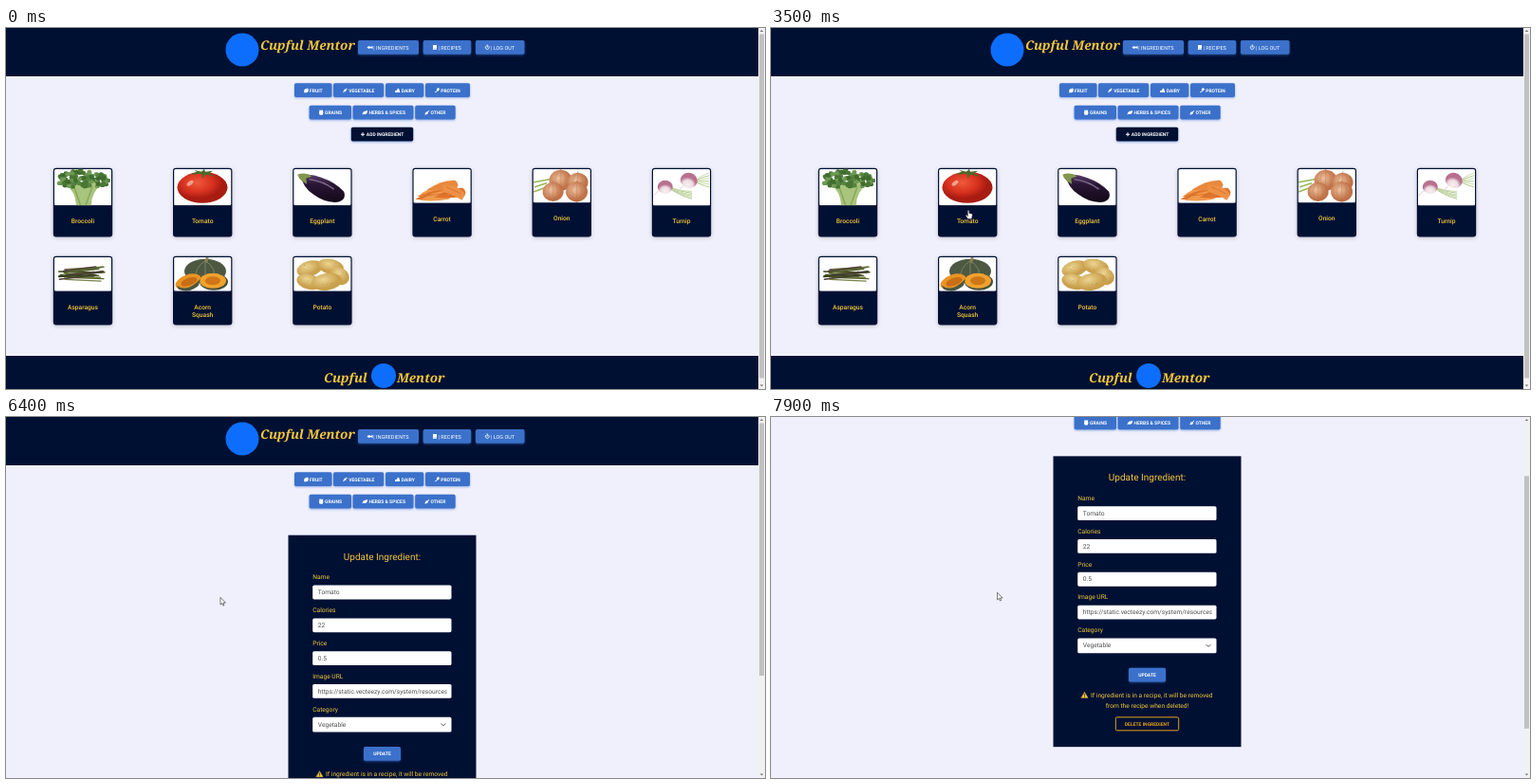
An HTML page that plays this animation: 800x381 px, repeating every 8000 ms.

```html
<!DOCTYPE html>
<html lang="en">
<head>
<meta charset="utf-8">
<title>Ingredients</title>
<style>
html, body { margin: 0; width: 100%; height: 100%; overflow: hidden; background: #f0f0fc; }
svg { display: block; width: 100%; height: 100%; }
text { font-family: Roboto, sans-serif; text-rendering: geometricPrecision; }
.brand { font: italic bold 13.5px "Noto Serif", serif; fill: #f4c63a; }
.btn { font-size: 5px; font-weight: 700; fill: #fff; }
.nav { font-size: 5.55px; fill: #fff; }
.gold { font-size: 6.67px; fill: #f4c63a; }
.field { font-size: 6.67px; fill: #4f4f4f; }
.mid { text-anchor: middle; }
.lift { filter: drop-shadow(0 1px 1.3px #3b71ca88); }
.card { filter: drop-shadow(0 1px 2px #0003); }
</style>
</head>
<body>
<svg id="stage" viewBox="0 0 800 381">
  <defs>
    <radialGradient id="red" cx=".4" cy=".35"><stop stop-color="#ef5a3c"/><stop offset=".6" stop-color="#d8321f"/><stop offset="1" stop-color="#a81c12"/></radialGradient>
    <radialGradient id="onion" cx=".4" cy=".4"><stop stop-color="#ecc09c"/><stop offset="1" stop-color="#c07248"/></radialGradient>
    <radialGradient id="turnip" cy=".8"><stop stop-color="#f8f0ee"/><stop offset=".6" stop-color="#ecdce2"/><stop offset="1" stop-color="#b8708e"/></radialGradient>
    <radialGradient id="potato" cx=".4" cy=".35"><stop stop-color="#ecd592"/><stop offset="1" stop-color="#c9a04c"/></radialGradient>
    <linearGradient id="plum" x2="0" y2="1"><stop stop-color="#57406a"/><stop offset=".35" stop-color="#2a1636"/><stop offset="1" stop-color="#120818"/></linearGradient>
    <clipPath id="urlBox"><path d="M326 282h138.5v16h-138.5z"/></clipPath>
    <clipPath id="photo"><path d="M1 1h60v39h-60z"/></clipPath>
  </defs>
  <g id="page"></g>
  <g id="bar"></g>
  <g id="cursor"></g>
</svg>
<script>
const NAVY = '#001033', BLUE = '#3b71ca', GOLD = '#f4c63a';
const $ = id => document.getElementById(id);
const rect = (x, y, w, h, fill, r = 0, more = '') =>
  `<rect x="${x}" y="${y}" width="${w}" height="${h}" rx="${r}" fill="${fill}" ${more}/>`;
const text = (x, y, cls, s, more = '') => `<text x="${x}" y="${y}" class="${cls}" ${more}>${s}</text>`;
const oval = (x, y, rx, ry, fill, turn = 0) =>
  `<ellipse cx="${x}" cy="${y}" rx="${rx}" ry="${ry}" fill="${fill}" transform="rotate(${turn} ${x} ${y})"/>`;
const path = (d, fill, stroke = 'none', w = 1) =>
  `<path d="${d}" fill="${fill}" stroke="${stroke}" stroke-width="${w}" stroke-linecap="round"/>`;
const repeat = (n, f) => Array.from({length: n}, (_, i) => f(i)).join('');

let seed = 7;
const rnd = () => (seed = seed * 16807 % 2147483647) / 2147483647;

// Icons on a 5 x 5 grid
const icons = {
  fish: 'M0 2.5Q2 .3 4.2 2L6 .8V4.2L4.2 3Q2 4.700 2.500Z',
  book: 'M.5 0H4.500V3.700H1.200V4.200H4.500V5H.5Z',
  fruit: 'M1.500 1H4.800V3Q4.500 5 2.500 5H.2V3Q.2 1.300 1.500 1ZM2.500 .8L4 0L4 .8Z',
  carrot: 'M0 5L1.500 1.700Q3 .6 3.600 2Q4 3 3 3.500ZM3.200 1.500L3.500 0L4.100 1L5 1.500L3.900 1.900Z',
  dairy: 'M0 3L2 2.500L3 .3L4.500 1.500L5.300 4.800H0Z',
  meat: 'M2 3.400Q1.300 .3 3.600 0Q5.500 .4 4.800 2Q4 3.400 2.500 3.500L1.300 4.700L.7 5L0 4.300L.6 3.800Z',
  grain: 'M.3 0H4.700L4.300 1.300L4.800 3L4 5H1L.2 3L.7 1.300Z',
  leaf: 'M0 5Q.2 1.500 3 1L5.500 .2Q5.500 4 2.800 4.200L1.200 4Z',
  other: 'M0 4.800L1 2.200Q2 1.300 3 1.500L4.700 0L5 .4L3.700 2.200Q3.900 4.300 2 4.500Z',
  plus: 'M2 .5H3V2H4.500V3H3V4.500H2V3H.5V2H2Z'
};
icons.fish = 'M0 2.5Q2 .3 4.2 2L6 .8V4.2L4.2 3Q2 4.7 0 2.5Z';
const icon = (name, x, y) => `<g transform="translate(${x} ${y})">${path(icons[name], '#fff')}</g>`;

function button(x, y, w, label, name, iconX, textX, fill = BLUE) {
  return rect(x, y, w, 14.7, fill, 1.7, 'class="lift"') + icon(name, iconX, y + 5) + text(textX, y + 9.4, 'btn', label);
}

const power = path('M511 18.600', 'none') +
  path('M506.200 18.800A2 2 0 1 0 508.400 18.800M507.300 17.800V20.300', 'none', '#fff', .8);
const header = rect(0, 0, 793, 51, NAVY) +
  '<circle cx="249" cy="23" r="17.500" fill="#0d6efd"/>' + text(268, 22.5, 'brand', 'Cupful Mentor') +
  [[371, 64], [439.7, 50.5], [495, 51.5]].map(([x, w]) => rect(x, 13, w, 14.8, BLUE, 1.7, 'class="lift"')).join('') +
  icon('fish', 380.5, 18) + text(387.3, 22.5, 'nav', '| INGREDIENTS') +
  icon('book', 449.5, 18) + text(455.5, 22.5, 'nav', '| RECIPES') +
  power + text(511, 22.5, 'nav', '| LOG OUT');

const filters = [
  [304, 58.3, 39.5, 'FRUIT', 'fruit', 314, 320], [345, 58.3, 53.2, 'VEGETABLE', 'carrot', 355, 361.2],
  [400, 58.3, 40.3, 'DAIRY', 'dairy', 410, 416.7], [442, 58.3, 47, 'PROTEIN', 'meat', 452, 458.2],
  [319.6, 81.8, 44.4, 'GRAINS', 'grain', 329.7, 336], [365.5, 81.8, 64, 'HERBS &amp; SPICES', 'leaf', 375.5, 382.5],
  [431.2, 81.8, 42.5, 'OTHER', 'other', 441.3, 447.5]
].map(b => button(...b)).join('');

const footer = y => rect(0, y, 793, 60, NAVY) + text(335, y + 28, 'brand', 'Cupful') +
  `<circle cx="398" cy="${y + 21}" r="13" fill="#0d6efd"/>` + text(412, y + 28, 'brand', 'Mentor');

// Food pictures, drawn from the card's top left corner
const food = {
  broccoli: () => path('M10 15Q24 24 24 40H40Q40 25 53 15Z', '#a9c47c') +
    path('M22 20L29 40M41 20L34 40', 'none', '#86a95c', 1.5) +
    repeat(110, () => {
      const a = rnd() * 6.28, d = Math.sqrt(rnd());
      const x = 31 + 28 * d * Math.cos(a), y = 10.5 + 9 * d * Math.sin(a) + Math.abs(x - 31) * .1;
      return oval(x, y, 2.6, 2.2, ['#3f6b2c', '#578441', '#6f9a55', '#487735'][rnd() * 4 | 0]);
    }),
  tomato: () => oval(31, 20.5, 26.5, 16.5, 'url(#red)') + oval(18, 16, 4, 2, '#f2a08c', -35) +
    path('M31 6L18 7L25 4L22 2L30 4L33 1L34 4L42 3L38 6L45 9L34 7L31 11Z', '#4a6a2c'),
  eggplant: () => path('M9 8Q18 5 30 10Q45 15 54 25Q57 34 47 36Q34 37 22 28Q10 20 9 8Z', 'url(#plum)') +
    path('M18 12Q32 14 43 22', 'none', '#7b6888', 1.5) + path('M5 7L8 6Q16 5 20 9L14 11L15 17L10 14L7 11Z', '#82964f'),
  carrot: () => repeat(6, i => {
    const x = [5, 9, 3, 15, 8, 23][i], y = [30, 27, 33, 23, 34, 31][i];
    return path(`M${x} ${y}Q${x + 17} ${y - 11} ${x + 30} ${y - 10}Q${x + 36} ${y - 5} ${x + 30} ${y - 1}Q${x + 15} ${y + 2} ${x} ${y}Z`,
      ['#e8883c', '#f09a4c', '#df742c'][i % 3]);
  }) + path('M32 18Q46 16 56 28L52 34Q45 29 32 25Z', '#ee9145') + path('M36 20L51 27M16 29L35 27', 'none', '#c9642a', .6),
  onion: () => path('M2 15L18 12M3 20L15 16M2 25L13 21', 'none', '#97b65b', 1.5) +
    [[30, 13, 12], [48, 15, 11], [22, 25, 11], [47, 25, 11.5]].map(([x, y, r]) =>
      oval(x, y, r, r * .92, 'url(#onion)') + path(`M${x} ${y - r}Q${x - r} ${y} ${x} ${y + r * .9}M${x} ${y - r}Q${x + r} ${y} ${x} ${y + r * .9}M${x} ${y - r}V${y + r * .9}`, 'none', '#b56d4780', .6)).join(''),
  turnip: () => repeat(6, i => path(`M44 14Q52 ${8 + i * 2} 60 ${5 + i * 3}M17 20Q28 ${24 + i} 42 ${25 + i * 1.5}`, 'none', i % 2 ? '#b3c990' : '#cbdcae', 1)) +
    oval(14, 20, 8, 7, 'url(#turnip)') + oval(39, 13, 9, 8, 'url(#turnip)', 15) + path('M7 24L2 29M33 19L28 24', 'none', '#d8c0c8', .8),
  asparagus: () => repeat(22, i => {
    const x = 5 + rnd() * 12, y = 13 + rnd() * 12;
    return path(`M${x} ${y}L${x + 34 + rnd() * 5} ${y - 5 + rnd() * 7}`, 'none', ['#39451f', '#58652f', '#788048', '#493c35'][i % 4], 1.4);
  }),
  squash: () => oval(34, 16, 22, 13, '#4d5842') +
    path('M34 5Q22 12 24 25M34 5Q46 12 44 25M34 5V24', 'none', '#7a8066', 1) + path('M33 6L35 1L38 2L36 7Z', '#8d8055') +
    oval(16, 27, 14, 7.5, '#e99524', -20) + oval(17, 27, 9, 4, '#c96d16', -20) +
    oval(43, 27, 15, 9, '#45503a') + oval(42, 26, 14, 8, '#f0a32d') + oval(42, 26, 8, 4.500, '#cf7619') +
    path('M4 31Q15 39 29 24L27 31Q17 40 6 35Z', '#4d5842'),
  potato: () => [[18, 13, 14, 8, -15], [40, 11, 14, 8, 12], [49, 21, 11, 9, 30], [17, 27, 13, 8, 15], [36, 27, 16, 9, -8]]
    .map(([x, y, a, b, turn]) => oval(x, y, a, b, 'url(#potato)', turn) +
      repeat(4, () => oval(x + rnd() * 14 - 7, y + rnd() * 8 - 4, .5, .4, '#a88240'))).join('')
};

const cards = [
  ['broccoli', 39.5, 'Broccoli'], ['tomato', 39.5, 'Tomato'], ['eggplant', 39.5, 'Eggplant'], ['carrot', 37, 'Carrot'],
  ['onion', 36.6, 'Onion'], ['turnip', 39.7, 'Turnip'], ['asparagus', 37, 'Asparagus'], ['squash', 37, 'Acorn Squash'], ['potato', 37, 'Potato']
].map(([name, h, title], i) => {
  const x = 49.8 + i % 6 * 126.2, y = i < 6 ? 147.8 : 240.8;
  const lines = title.split(' ').map((s, k) => text(31.2, h + 19 + k * 8, 'gold mid', s, 'font-weight="500"')).join('');
  return `<g transform="translate(${x} ${y})"><g id="${name}" class="card">${rect(0, 0, 62.4, 72.6, NAVY, 3)}
    ${rect(1.2, 1.2, 60, h - 1.2, '#fff', 1.5)}<g clip-path="url(#photo)">${food[name]()}</g>
    ${rect(1, h, 60.4, 5, NAVY)}${lines}</g></g>`;
}).join('');

const fields = [['Name', 'Tomato'], ['Calories', '22'], ['Price', '0.5'],
  ['Image URL', 'https://static.vecteezy.com/system/resources'], ['Category', 'Vegetable']
].map(([label, value], i) => {
  const y = 177.6 + i * 34.8;
  return text(323.2, y - 6.2, 'gold', label) + rect(323.2, y, 146.3, i < 4 ? 14.8 : 15.8, '#fff', 1.6) +
    text(328.8, y + 9.6 + (i > 3) * .4, 'field', value, i === 3 ? 'clip-path="url(#urlBox)"' : '');
}).join('');

const form = rect(297.5, 124.7, 198, 306.8, NAVY) +
  text(396.5, 150.5, 'mid', 'Update Ingredient:', `font-size="10" fill="${GOLD}"`) + fields +
  path('M459 323.800L461 325.800L463 323.800', 'none', '#343a40', .9) +
  rect(377, 348, 39, 14.8, BLUE, 1.7, 'class="lift"') + text(396.5, 357.3, 'btn mid', 'UPDATE') +
  path('M330.600 374L334 379.700H327.200Z', GOLD, GOLD, .5) + path('M330.600 375.800V377.600M330.600 378.700V378.800', 'none', NAVY, .7) +
  text(337, 379.3, 'gold', 'If ingredient is in a recipe, it will be removed') +
  text(396.5, 390, 'gold mid', 'from the recipe when deleted!') +
  rect(363.3, 400.2, 66.4, 14, 'none', 1.5, 'stroke="#e4a11b" stroke-width="1"') +
  text(396.5, 409, 'btn mid', 'DELETE INGREDIENT', 'style="fill:#e4a11b"');

$('page').innerHTML = header + filters +
  `<g id="list">${button(363.8, 104.8, 65.4, 'ADD INGREDIENT', 'plus', 373.5, 379.8, NAVY)}${cards}${footer(346)}</g>` +
  `<g id="form">${form}${footer(465)}</g>`;
$('bar').innerHTML = rect(793, 0, 7, 381, '#f1f1f1') + rect(794, 6.5, 5, 363, '#c1c1c1', 0, 'id="thumb"') +
  path('M794.700 4L796.500 2L798.300 4ZM794.700 376.500L796.500 378.500L798.300 376.500Z', '#777');
$('cursor').innerHTML =
  `<g id="arrow">${path('M0 0V7.200L1.700 5.700L2.800 8.300L4 7.800L2.900 5.300H5.100Z', '#fff', '#222', .6)}</g>` +
  `<g id="hand">${path('M-.8 .6Q0-.4 .8 .6V3.300L3.600 4Q4.300 4.300 4.200 5.500L3.500 9.300H-.6L-2.900 5.900Q-2.800 4.800-1.700 5.300L-.8 6.300Z', '#fff', '#222', .6)}</g>`;

// Time, x, y of the pointer
const track = [[1900, 370, 82], [2300, 354, 94.5], [2700, 354, 94.5], [3600, 203, 195.5], [5900, 203, 195.5],
  [6300, 226, 190.8], [6500, 226, 190.8], [6900, 238.6, 186.7], [7300, 238.6, 186], [8000, 238.6, 185.7]];
const SWITCH = 5700;
const ease = (t, start, span) => {
  const p = Math.min(1, Math.max(0, (t - start) / span));
  return p * p * (3 - 2 * p);
};
const show = (id, on) => $(id).setAttribute('display', on ? 'inline' : 'none');
const move = (id, x, y) => $(id).setAttribute('transform', `translate(${x} ${y})`);

function draw(t) {
  const onForm = t >= SWITCH;
  const scroll = 41.67 * (ease(t, 6680, 180) + ease(t, 7400, 180));
  show('list', !onForm);
  show('form', onForm);
  move('page', 0, -scroll);
  $('thumb').setAttribute('y', 6.5 + scroll * .67);
  $('thumb').setAttribute('height', onForm ? 266.5 : 363);

  const zoom = 1 + .15 * ease(t, 3500, 300);
  $('tomato').setAttribute('transform', `translate(31.2 36.3) scale(${zoom}) translate(-31.2 -36.3)`);

  show('cursor', t >= track[0][0]);
  const k = Math.max(1, track.findIndex(p => p[0] > t));
  const [t0, x0, y0] = track[k - 1], [t1, x1, y1] = track[k];
  const p = ease(t, t0, t1 - t0);
  move('cursor', x0 + (x1 - x0) * p, y0 + (y1 - y0) * p);
  const hand = t < 2850 || t > 3400 && !onForm;
  show('hand', hand);
  show('arrow', !hand);
}

const start = performance.now();
(function tick() {
  draw((performance.now() - start) % 8000);
  requestAnimationFrame(tick);
})();
</script>
</body>
</html>
```
